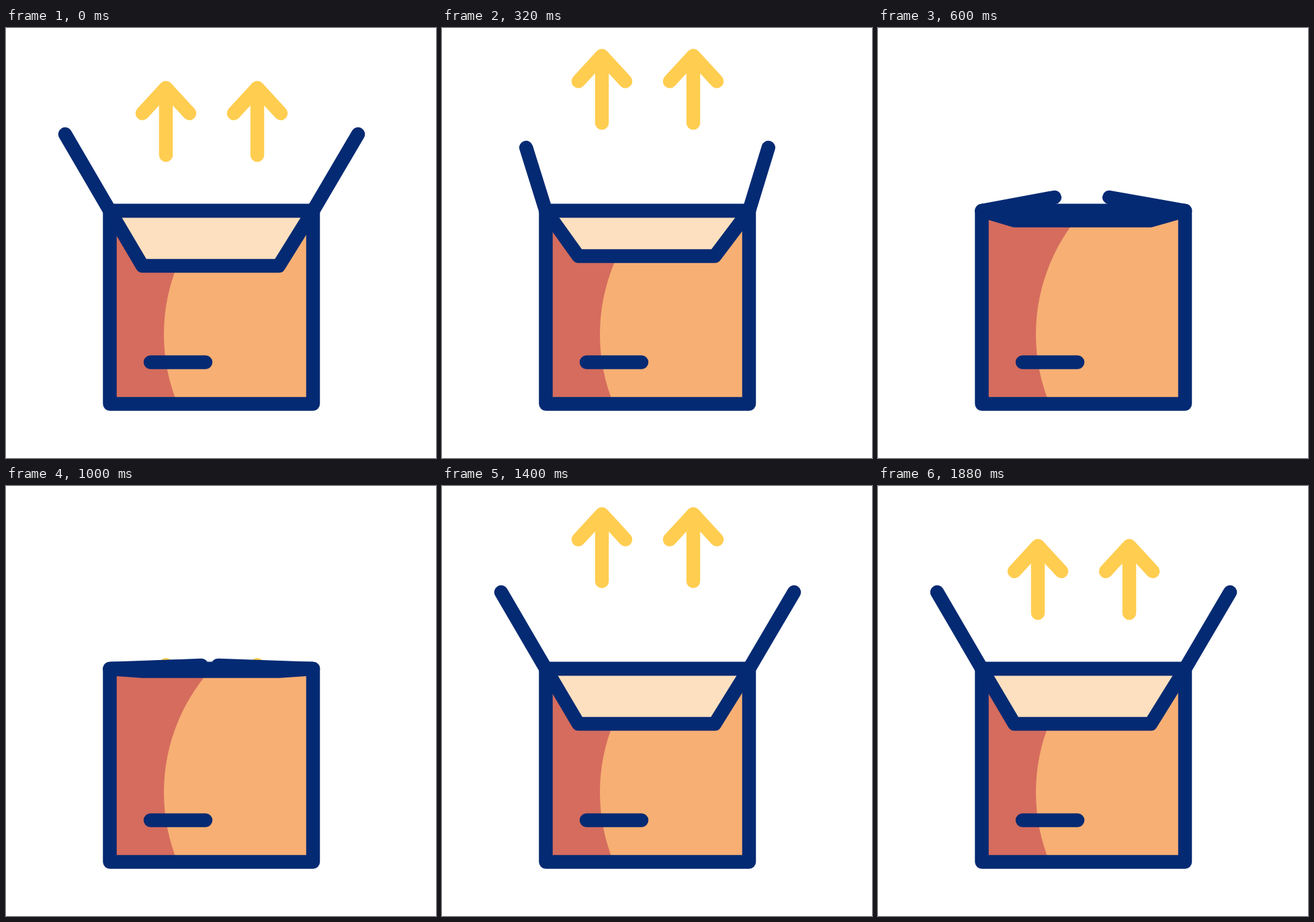
Recreate the animation shown at these times as an HTML page. Size 640 by 640 pixels, loop 2440 ms.

```html
<!DOCTYPE html>
<html lang="en">
<head>
<meta charset="utf-8">
<title>Box</title>
<style>
  html, body { margin: 0; width: 100%; height: 100%; overflow: hidden; background: #fff; }
  svg { display: block; width: 100vw; height: 100vh; }
  .line { fill: none; stroke: #042a73; stroke-width: 20.5; stroke-linecap: round; stroke-linejoin: round; }
  #arrows { stroke: #ffcd50; }
</style>
</head>
<body>
<svg viewBox="0 0 640 640">
  <defs>
    <clipPath id="face"><path d="M154.5 272H457V559.5H154.5Z"/></clipPath>
    <path id="arrow" d="M0 189V89M-35 127L0 89L35 127"/>
  </defs>
  <g id="arrows" class="line">
    <use href="#arrow" x="238"/>
    <use href="#arrow" x="374"/>
  </g>
  <g clip-path="url(#face)">
    <path fill="#d56c5d" d="M154 272H457V560H154Z"/>
    <circle fill="#f7af74" cx="510" cy="456" r="275"/>
  </g>
  <path id="front" class="line" style="fill:#fde0bf"/>
  <path class="line" d="M154.5 272H457V559.5H154.5ZM215 497.5H297"/>
  <path id="sides" class="line"/>
</svg>
<script>
const FRAME = 40, LOOP = 2440;
const $ = id => document.getElementById(id);

// Keys are [frame, value] pairs, eased in and out between neighbours.
const CLOSED = [[4, 0], [19, 1], [24, 1], [32, 0]];
const LIFT = [[1, 0], [8, -47.7], [15, 195], [24, 195], [30, -43], [39, -50.5], [47, 0]];

const mix = (a, b, p) => a + (b - a) * p;

function valueAt(keys, f) {
  const i = keys.findIndex(k => k[0] > f);
  if (i < 0) return keys[keys.length - 1][1];
  if (i === 0) return keys[0][1];
  const [f0, a] = keys[i - 1], [f1, b] = keys[i];
  const x = (f - f0) / (f1 - f0);
  return mix(a, b, x * x * (3 - 2 * x));
}

function draw(f) {
  const p = valueAt(CLOSED, f);
  const tipY = mix(158, 272, p);
  const lip = mix(354, 272, p);
  $("arrows").setAttribute("transform", `translate(0 ${valueAt(LIFT, f)})`);
  $("front").setAttribute("d", `M154.5 272L203 ${lip}H406L457 272Z`);
  $("sides").setAttribute("d",
    `M154.5 272L${mix(88, 300, p)} ${tipY}M457 272L${mix(524, 306, p)} ${tipY}`);
}

const start = performance.now();
function tick() {
  draw(Math.floor((performance.now() - start) % LOOP / FRAME));
  requestAnimationFrame(tick);
}
tick();
</script>
</body>
</html>
```
